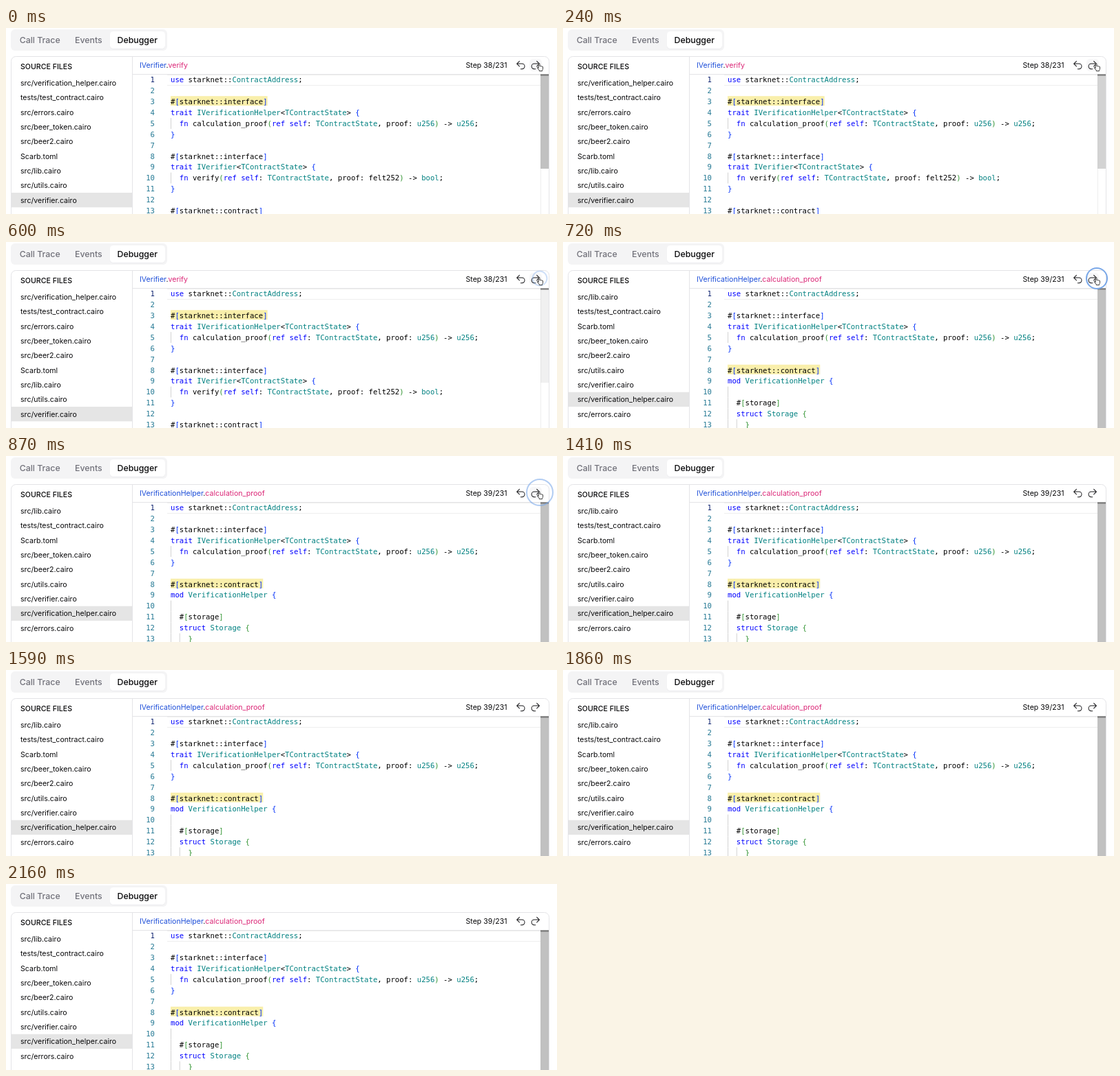
Animation, 800 px wide and 271 px high, one loop 2.19 s. Source, as an HTML page:

```html
<!DOCTYPE html>
<html lang="en">
<head>
<meta charset="utf-8">
<title>Debugger step</title>
<style>
  html, body { margin: 0; width: 100%; height: 100%; overflow: hidden; background: #fff; }
  svg { display: block; }
  text { font: 10.6px Inter, sans-serif; fill: #09090b; white-space: pre; }
  .tab { font-size: 12.35px; font-weight: 500; }
  .title { font-weight: 500; }
  .off { fill: #71717a; }
  .code { font: 10.62px "DejaVu Sans Mono", monospace; fill: #000; }
  .icon { fill: none; stroke: #18181b; stroke-width: 1.6; stroke-linecap: round; stroke-linejoin: round; }
</style>
</head>
<body>
<svg width="800" height="271" viewBox="0 0 800 271">
  <rect x="7" y="2" width="227" height="31" rx="6" fill="#f4f4f5"/>
  <rect x="151" y="5.5" width="80" height="25" rx="4.5" fill="#e4e4e7"/>
  <rect x="151" y="5" width="80" height="25" rx="4.5" fill="#fff"/>
  <text class="tab off" x="19.7" y="22">Call Trace</text>
  <text class="tab off" x="100" y="22">Events</text>
  <text class="tab" x="161.5" y="22">Debugger</text>

  <rect x="7.5" y="41.5" width="781" height="260" rx="7" fill="#fff" stroke="#e4e4e7"/>
  <path d="M183.5 42V271M184 67.5H788" stroke="#e4e4e7"/>
  <path d="M234 68.5H776M234 83.5H776M776.5 68V271" stroke="#eee"/>
  <text class="title" x="21" y="59.5">SOURCE FILES</text>
  <g id="view"></g>
  <rect id="thumb" x="776" y="67" width="12" fill="#c1c1c1"/>
  <rect x="776" y="67.5" width="12" height="2" fill="#777"/>

  <rect id="hover" x="760" y="45" width="18" height="18" rx="5" fill="#f7f7f8"/>
  <g class="icon">
    <path transform="translate(739.8 46.4) scale(.63)" d="M9 15 3 9l6-6M3 9h12a6 6 0 0 1 0 12h-3"/>
    <path transform="translate(761.2 46.4) scale(.63)" d="m15 15 6-6-6-6M21 9H9a6 6 0 0 0 0 12h3"/>
  </g>
  <circle id="ring" cx="775" cy="53" fill="none" stroke="#78a7e8" stroke-width="2"/>
  <path id="hand" fill="#fff" stroke="#222" stroke-width=".9" stroke-linejoin="round"
    d="M773.2 58.5V52.6q0-1 .9-1t.9 1V55.6q.9-.7 1.6.2q.9-.5 1.5.3q1.4-.4 1.4 1.1V59.3q0 1.300-1 2.300V62.700H774.300V61.700L771.500 58.300q-.4-1 .5-1.200q.6 0 1.200 1.400Z"/>
</svg>
<script>
const LOOP = 2190, CLICK = 570, STEP = 660, LEAVE = 1410, RIPPLE = 510, FADE = 800;
const CHAR = 6.393, LEFT = 239, ROW = 15.9, ITEM = 21.3;
const $ = id => document.getElementById(id);

const head = `use starknet::ContractAddress;

#[starknet::interface]
trait IVerificationHelper<TContractState> {
  fn calculation_proof(ref self: TContractState, proof: u256) -> u256;
}

`;
const steps = [
  {
    step: 38, scope: "IVerifier", fn: "verify", mark: 2, picked: 8, thumb: 138,
    files: "src/verification_helper.cairo tests/test_contract.cairo src/errors.cairo src/beer_token.cairo src/beer2.cairo Scarb.toml src/lib.cairo src/utils.cairo src/verifier.cairo",
    code: head + `#[starknet::interface]
trait IVerifier<TContractState> {
  fn verify(ref self: TContractState, proof: felt252) -> bool;
}

#[starknet::contract]`
  },
  {
    step: 39, scope: "IVerificationHelper", fn: "calculation_proof", mark: 7, picked: 7, thumb: 204,
    files: "src/lib.cairo tests/test_contract.cairo Scarb.toml src/beer_token.cairo src/beer2.cairo src/utils.cairo src/verifier.cairo src/verification_helper.cairo src/errors.cairo",
    code: head + `#[starknet::contract]
mod VerificationHelper {

  #[storage]
  struct Storage {
    }`
  }
];

const esc = s => s.replace(/</g, "&lt;").replace(/>/g, "&gt;");
const span = (color, s) => `<tspan fill="${color}">${esc(s)}</tspan>`;
const rect = (x, y, w, h, fill) => `<rect x="${x}" y="${y}" width="${w}" height="${h}" fill="${fill}"/>`;

// Colours keywords, types, and brackets by nesting depth.
function colorize(code) {
  let depth = 0;
  const bracket = c => {
    if ("])}".includes(c)) depth--;
    const color = depth % 2 ? "#319331" : "#0431fa";
    if ("[({".includes(c)) depth++;
    return span(color, c);
  };
  const token = s =>
    /^(use|trait|fn|ref|self|mod|struct)$/.test(s) ? span("#0000ff", s) :
    /^([A-Z]\w*|u256|bool)$/.test(s) ? span("#008080", s) :
    /^[[\](){}]$/.test(s) ? bracket(s) : esc(s);
  return code.split("\n").map(line => line.split(/(\w+|[[\](){}])/).map(token).join(""));
}

function render(s) {
  const lines = s.code.split("\n");
  let out = rect(8, 240 + (s.picked - 8) * ITEM, 175, 21.3, "#e5e5e5");
  s.files.split(" ").forEach((f, i) => out += `<text x="21" y="${84.1 + i * ITEM}">${f}</text>`);
  out += `<text x="194" y="58">${span("#1d4ed8", s.scope)}.${span("#db2777", s.fn)}</text>`;
  out += `<text x="667.5" y="58">Step ${s.step}/231</text>`;
  out += rect(LEFT, 67.4 + s.mark * ROW, lines[s.mark].length * CHAR, 14, "#f9efab");
  colorize(s.code).forEach((line, i) => {
    const y = 79.2 + i * ROW, nested = /^ /.test(lines[i]) || (!lines[i] && i === 9);
    if (nested) out += rect(LEFT, y - 11.7, 1, ROW, "#d3d3d3");
    if (/^ {4}/.test(lines[i])) out += rect(LEFT + 2 * CHAR, y - 11.7, 1, ROW, "#d3d3d3");
    out += `<text class="code" x="216" y="${y}" text-anchor="end" style="fill:${i ? "#237893" : "#0b216f"}">${i + 1}</text>`;
    out += `<text class="code" x="${LEFT}" y="${y}">${line}</text>`;
  });
  return out;
}

const views = steps.map(render);
let shown = -1;

function draw(now) {
  const t = now % LOOP, next = t < STEP ? 0 : 1;
  if (next !== shown) $("view").innerHTML = views[shown = next];
  $("thumb").setAttribute("height", steps[next].thumb);
  $("thumb").setAttribute("opacity", next ? 1 : 1 - t / FADE);
  $("hand").style.display = $("hover").style.display = t < LEAVE ? "" : "none";
  const p = (t - CLICK) / RIPPLE, on = p >= 0 && p < 1;
  $("ring").setAttribute("r", on ? 9 + 12 * (1 - (1 - p) ** 2) : 0);
  $("ring").setAttribute("opacity", on ? Math.min(1, 0.15 + p * 3.5, (1 - p) * 1.4) : 0);
}

const start = performance.now();
function tick() {
  draw(performance.now() - start);
  requestAnimationFrame(tick);
}
tick();
</script>
</body>
</html>
```
